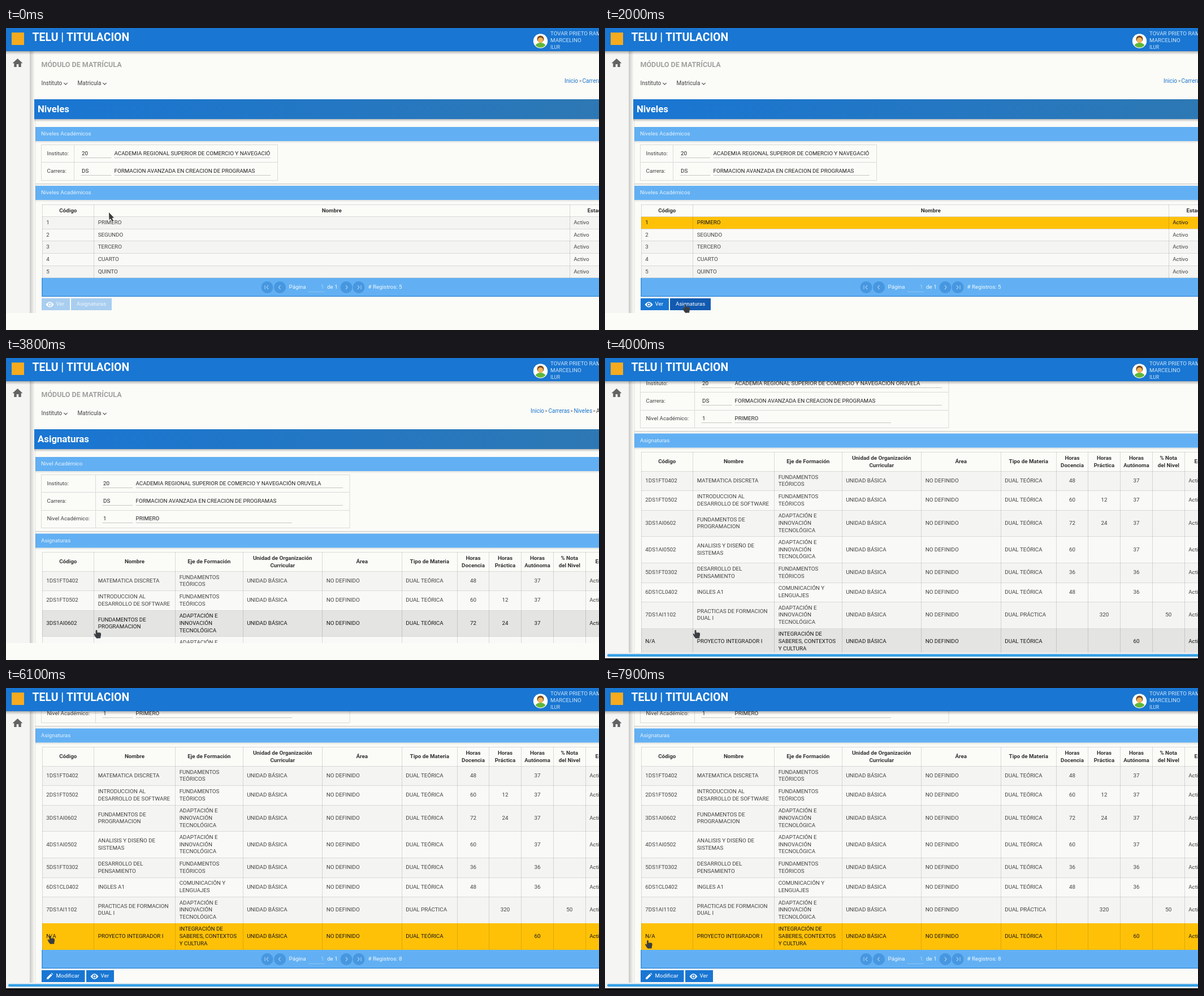
An HTML page with a canvas for the animation above (8 s loop, 1049x534 px).

```html
<!DOCTYPE html>
<html lang="es">
<head>
<meta charset="utf-8">
<title>Niveles y asignaturas</title>
<style>
html, body { margin: 0; width: 100%; height: 100%; overflow: hidden; background: #fbfbf8; }
canvas { display: block; }
</style>
</head>
<body>
<canvas id="stage" width="1049" height="534"></canvas>
<script>
const W = 1049, H = 534, LOOP = 8000, STEP = 100;
const ctx = document.getElementById('stage').getContext('2d');
const PAPER = '#fbfbf8', BLUE = '#1976d2', SKY = '#62b0f3', LINE = '#dadad8', INK = '#424242', AMBER = '#ffc107';
const SIZE = 9.8, SCROLL = 239;

const SCHOOL = 'ACADEMIA REGIONAL SUPERIOR DE COMERCIO Y NAVEGACIÓN ORUVELA';
const CAREER = 'FORMACION AVANZADA EN CREACION DE PROGRAMAS';

// Cursor stops: time, x, y of the tip
const PATH = [
  [0, 182, 326], [500, 136, 341], [1400, 136, 341], [1900, 142, 489], [2500, 142, 489],
  [2900, 157, 491], [3400, 157, 491], [3800, 160, 481], [4300, 160, 481], [5000, 239, 444],
  [5200, 239, 444], [6100, 78, 438], [7200, 78, 438], [7300, 75.5, 446]
];

const LEVELS = {
  top: 312, head: 21.5, pager: 442, cols: [64, 155.5, 997, 1090],
  titles: ['Código', 'Nombre', 'Estado'], centered: [],
  rows: ['PRIMERO', 'SEGUNDO', 'TERCERO', 'CUARTO', 'QUINTO'].map((n, i) => [String(i + 1), n, 'Activo']),
  rowHeight: () => 21.7
};

const BASIS = 'FUNDAMENTOS\nTEÓRICOS', ADAPT = 'ADAPTACIÓN E\nINNOVACIÓN\nTECNOLÓGICA';
const subject = (code, name, axis, a, b, c, note = '', kind = 'TEÓRICA') =>
  [code, name, axis, 'UNIDAD BÁSICA', 'NO DEFINIDO', 'DUAL ' + kind, a, b, c, note, 'Activo'];

const SUBJECTS = {
  top: 343.5, head: 34, pager: 702, cols: [64, 155.5, 299.5, 419, 559.5, 700, 798.5, 854.5, 911.5, 968.5, 1025, 1090],
  titles: ['Código', 'Nombre', 'Eje de Formación', 'Unidad de Organización\nCurricular', 'Área', 'Tipo de Materia',
    'Horas\nDocencia', 'Horas\nPráctica', 'Horas\nAutónoma', '% Nota\ndel Nivel', 'Estado'],
  centered: [6, 7, 8, 9],
  rows: [
    subject('1DS1FT0402', 'MATEMATICA DISCRETA', BASIS, '48', '', '37'),
    subject('2DS1FT0502', 'INTRODUCCION AL\nDESARROLLO DE SOFTWARE', BASIS, '60', '12', '37'),
    subject('3DS1AI0602', 'FUNDAMENTOS DE\nPROGRAMACION', ADAPT, '72', '24', '37'),
    subject('4DS1AI0502', 'ANALISIS Y DISEÑO DE\nSISTEMAS', ADAPT, '60', '', '37'),
    subject('5DS1FT0302', 'DESARROLLO DEL\nPENSAMIENTO', BASIS, '36', '', '36'),
    subject('6DS1CL0402', 'INGLES A1', 'COMUNICACIÓN Y\nLENGUAJES', '48', '', '36'),
    subject('7DS1AI1102', 'PRACTICAS DE FORMACION\nDUAL I', ADAPT, '', '320', '', '50', 'PRÁCTICA'),
    subject('N/A', 'PROYECTO INTEGRADOR I', 'INTEGRACIÓN DE\nSABERES, CONTEXTOS\nY CULTURA', '', '', '60')
  ],
  rowHeight: row => row[2].split('\n').length > 2 ? 46.8 : 34.3
};

for (const table of [LEVELS, SUBJECTS]) {
  let y = table.top + table.head;
  table.edges = [y, ...table.rows.map(row => y += table.rowHeight(row))];
}

function box(x, y, w, h, color) {
  ctx.fillStyle = color;
  ctx.fillRect(x, y, w, h);
}

function fade(x, y, w, h, from, to, across) {
  const g = across ? ctx.createLinearGradient(x, 0, x + w, 0) : ctx.createLinearGradient(0, y, 0, y + h);
  g.addColorStop(0, from);
  g.addColorStop(1, to);
  box(x, y, w, h, g);
}

// y is the vertical middle of the text block
function text(str, x, y, { size = SIZE, color = INK, weight = 400, align = 'left' } = {}) {
  ctx.font = `${weight} ${size}px Roboto, sans-serif`;
  ctx.fillStyle = color;
  ctx.textAlign = align;
  const lines = str.split('\n');
  lines.forEach((s, i) => ctx.fillText(s, x, y + size * 0.355 + (i - (lines.length - 1) / 2) * 12.6));
}

function stroke(color, width, points) {
  ctx.strokeStyle = color;
  ctx.lineWidth = width;
  ctx.beginPath();
  points.forEach(([x, y]) => ctx.lineTo(x, y));
  ctx.stroke();
}

function shape(color, points) {
  ctx.fillStyle = color;
  ctx.beginPath();
  points.forEach(([x, y]) => ctx.lineTo(x, y));
  ctx.closePath();
  ctx.fill();
}

function disc(x, y, r, color) {
  ctx.fillStyle = color;
  ctx.beginPath();
  ctx.arc(x, y, r, 0, Math.PI * 2);
  ctx.fill();
}

function clipped(x, y, w, h, draw) {
  ctx.save();
  ctx.beginPath();
  ctx.rect(x, y, w, h);
  ctx.clip();
  draw();
  ctx.restore();
}

function panelHead(label, y) {
  fade(52, y + 25, W, 4, 'rgba(0,0,0,.10)', 'rgba(0,0,0,0)');
  box(52, y, W, 25, SKY);
  text(label, 62, y + 12, { color: '#e6f2fd' });
}

function form(right, split, rows) {
  const top = 206.5, step = 31.4, bottom = top + step * rows.length;
  ctx.strokeStyle = LINE;
  ctx.lineWidth = 1;
  ctx.strokeRect(62.5, top, right - 62.5, Math.round(bottom - top));
  stroke(LINE, 1, [[split, top], [split, bottom]]);
  rows.forEach(([label, code, name, end], i) => {
    const y = top + step * i, mid = y + 14.6, base = Math.floor(y + 22.6);
    if (i) stroke(LINE, 1, [[62, Math.floor(y) + 0.5], [right, Math.floor(y) + 0.5]]);
    text(label, 72.5, mid);
    text(code, split + 13.5, mid, { color: '#222' });
    clipped(split + 70, y, end - split - 71, step, () => text(name, split + 71, mid, { color: '#222' }));
    box(split + 12, base, 54, 1, '#c6c6c4');
    box(split + 71, base, end - split - 71, 1, '#c6c6c4');
  });
}

function grid(table, hover, picked) {
  const { cols, top, edges, rows, pager } = table;
  const mid = i => (cols[i] + cols[i + 1]) / 2;
  const snap = y => Math.floor(y) + 0.5;
  rows.forEach((row, r) => box(64, edges[r], W, edges[r + 1] - edges[r], r === hover ? '#e4e4e2' : r % 2 ? '#f9f9f7' : '#f4f4f2'));
  [top, ...edges].forEach(y => stroke(LINE, 1, [[64, snap(y)], [W, snap(y)]]));
  if (picked >= 0) {
    const y = Math.round(edges[picked]);
    box(64, y, W, Math.round(edges[picked + 1]) - y, AMBER);
  }
  cols.forEach(x => stroke('rgba(0,0,0,.13)', 1, [[snap(x), top], [snap(x), pager]]));

  table.titles.forEach((s, i) => text(s, mid(i), top + table.head / 2 - 0.7, { weight: 700, color: '#333', align: 'center' }));
  rows.forEach((row, r) => {
    const y = (edges[r] + edges[r + 1]) / 2 - 1;
    const color = r === picked || r === hover ? '#161616' : INK;
    row.forEach((s, c) => {
      const center = table.centered.includes(c);
      text(s, center ? mid(c) : cols[c] + 7.2, y, { color, align: center ? 'center' : 'left' });
    });
  });
  pagerBar(pager, rows.length);
}

function pagerBar(y, count) {
  const mid = y + 16;
  box(63.5, y, W, 33, SKY);
  box(63.5, y, 1, 33, BLUE);
  box(63.5, y + 32, W, 1, BLUE);
  [462, 484.5, 602, 624].forEach((x, i) => {
    const dir = i < 2 ? -1 : 1, edge = i === 0 || i === 3;
    disc(x, mid + 0.5, 10.5, '#4797e0');
    const tip = x + dir * (edge ? 1 : 2);
    stroke('#9ccbf5', 1.2, [[tip - dir * 3, mid - 3], [tip, mid + 0.5], [tip - dir * 3, mid + 4]]);
    if (edge) stroke('#9ccbf5', 1.2, [[x + dir * 4, mid - 3], [x + dir * 4, mid + 4]]);
  });
  const white = { color: '#f4f9fe' };
  text('Página', 500.5, mid, white);
  text('1', 557, mid, { color: '#a9d3f8' });
  box(535, mid + 8, 29, 1, '#8cc4f5');
  text('de 1', 568, mid, white);
  text('# Registros: ' + count, 640.5, mid, white);
}

function eye(x, y) {
  ctx.fillStyle = '#fff';
  ctx.beginPath();
  ctx.moveTo(x - 7, y);
  ctx.quadraticCurveTo(x, y - 9.5, x + 7, y);
  ctx.quadraticCurveTo(x, y + 9.5, x - 7, y);
  ctx.fill();
}

function button(x, y, w, label, icon, enabled, hot) {
  const color = !enabled ? '#a8cef0' : hot ? '#125ab0' : BLUE;
  box(x, y, w, 21, color);
  const mid = y + 10;
  if (icon === 'eye') {
    eye(x + 14.5, mid + 1);
    disc(x + 14.5, mid + 1, 3.2, color);
    disc(x + 14.5, mid + 1, 1.8, '#fff');
  } else if (icon === 'pencil') {
    const px = x + 9, py = mid + 6;
    shape('#fff', [[px, py], [px, py - 2.6], [px + 7, py - 9.5], [px + 9.6, py - 7], [px + 2.6, py]]);
    shape('#fff', [[px + 8, py - 10.4], [px + 9, py - 11.2], [px + 11.4, py - 8.8], [px + 10.5, py - 7.9]]);
  }
  text(label, x + (icon ? 25.5 : 10), mid, { color: enabled ? '#fff' : '#eef5fb' });
}

function chevron(x, y) {
  stroke('#555', 1.1, [[x - 3.2, y - 1.6], [x, y + 1.6], [x + 3.2, y - 1.6]]);
}

function crumbs(items) {
  items.forEach(([s, x]) => text(s, x, 93.5, { size: s === '>' ? 8 : 10, color: s.length > 1 ? '#1b76cc' : '#444' }));
}

function pageTop(title) {
  text('MÓDULO DE MATRÍCULA', 62.5, 64.5, { size: 12.5, weight: 700, color: '#a0a09e' });
  text('Instituto', 62.5, 97, { size: 10 });
  text('Matricula', 126.5, 97, { size: 10 });
  chevron(105.5, 98.5);
  chevron(174.5, 98.5);
  fade(50, 161, W, 5, 'rgba(0,0,0,.25)', 'rgba(0,0,0,0)');
  fade(50, 126, W - 50, 35, '#1976d3', '#2d78b4', true);
  text(title, 56, 143.5, { size: 16.8, weight: 700, color: '#fff' });
}

function panelEdge(y) {
  box(52, y, W, 1, '#cfcfcd');
  fade(52, y + 1, W, 3, 'rgba(0,0,0,.07)', 'rgba(0,0,0,0)');
}

function levelsPage(s) {
  pageTop('Niveles');
  crumbs([['Inicio', 988], ['>', 1014], ['Carreras', 1019.5]]);
  panelEdge(275);
  panelHead('Niveles Académicos', 175);
  form(480.5, 120.5, [['Instituto:', '20', SCHOOL, 468], ['Carrera:', 'DS', CAREER, 468]]);
  panelHead('Niveles Académicos', 279);
  grid(LEVELS, s.hover, s.picked);
  const on = s.picked >= 0;
  button(63, 478, 50, 'Ver', 'eye', on);
  button(115, 478, 72, 'Asignaturas', '', on, s.y > 478);
}

function subjectsPage(s) {
  pageTop('Asignaturas');
  crumbs([['Inicio', 928], ['>', 953.5], ['Carreras', 959.5], ['>', 998.5], ['Niveles', 1004.5], ['>', 1038.5], ['A', 1044]]);
  panelEdge(306);
  panelHead('Nivel Académico', 175);
  form(608, 158.5, [['Instituto:', '20', SCHOOL, 596], ['Carrera:', 'DS', CAREER, 596], ['Nivel Académico:', '1', 'PRIMERO', 506]]);
  panelHead('Asignaturas', 310.5);
  grid(SUBJECTS, s.hover, s.picked);
  const on = s.picked >= 0;
  button(63, 738, 76.5, 'Modificar', 'pencil', on);
  button(142, 738, 49, 'Ver', 'eye', on);
}

function avatar(x, y) {
  disc(x, y, 12.7, '#fdfdfb');
  ctx.save();
  ctx.beginPath();
  ctx.arc(x, y, 11.5, 0, Math.PI * 2);
  ctx.clip();
  ctx.fillStyle = '#5fb83a';
  ctx.beginPath();
  ctx.ellipse(x, y + 10, 9.5, 7, 0, 0, Math.PI * 2);
  ctx.fill();
  ctx.restore();
  disc(x, y - 3.5, 6, '#7a4a1c');
  disc(x, y - 1.5, 4.8, '#f3b25a');
}

function header(loaded) {
  fade(0, 41, W, 6, 'rgba(0,0,0,.28)', 'rgba(0,0,0,0)');
  box(0, 0, W, 41, BLUE);
  text('TELU | TITULACION', 46.5, 16, { size: 19.4, weight: 700, color: '#fff' });
  if (!loaded) return;
  box(10, 8, 22, 22, '#f6ab1f');
  avatar(945.5, 23);
  const pale = { color: '#cfe4f8' };
  text('TOVAR PRIETO RAMIRO', 963, 9.5, pale);
  text('MARCELINO', 963, 22, pale);
  text('ILUR', 963, 34.5, { size: 8.4, color: '#cfe4f8' });
}

function sidebar(bottom) {
  box(0, 41, 42, bottom - 41, '#f5f5f3');
  fade(42, 41, 9, bottom - 41, 'rgba(0,0,0,.20)', 'rgba(0,0,0,0)', true);
  shape('#636363', [[20.5, 54], [29.5, 62.3], [26.7, 62.3], [26.7, 69], [22.3, 69], [22.3, 64], [18.7, 64],
    [18.7, 69], [14.3, 69], [14.3, 62.3], [11.5, 62.3]]);
}

function arrow(x, y) {
  shape('#3c3c3c', [[x, y], [x + 0.5, y + 13.5], [x + 3, y + 11], [x + 5.5, y + 16], [x + 8, y + 15], [x + 5.5, y + 10], [x + 9, y + 9.5]]);
}

function hand(x, y) {
  ctx.fillStyle = '#3a3d42';
  ctx.beginPath();
  ctx.roundRect(x - 1.4, y, 2.8, 9, 1.4);
  ctx.roundRect(x - 1.4, y + 4.4, 9.4, 7.6, 2.2);
  ctx.roundRect(x, y + 8.5, 7.4, 6, 1);
  ctx.fill();
  shape('#3a3d42', [[x - 4.6, y + 7], [x - 3.2, y + 6.2], [x - 1, y + 8.5], [x + 3, y + 14.5], [x, y + 14.5], [x - 2.4, y + 11.4]]);
}

const ease = p => p * p * (3 - 2 * p);
const ramp = (t, a, b) => ease(Math.min(1, Math.max(0, (t - a) / (b - a))));

function cursorAt(t) {
  const i = PATH.findIndex(p => p[0] > t);
  if (i < 0) return PATH[PATH.length - 1].slice(1);
  const [t0, x0, y0] = PATH[i - 1], [t1, x1, y1] = PATH[i], p = ramp(t, t0, t1);
  return [x0 + (x1 - x0) * p, y0 + (y1 - y0) * p];
}

function draw(t) {
  const second = t >= 2600;
  const table = second ? SUBJECTS : LEVELS;
  const scroll = Math.round(SCROLL * ramp(t, 3800, 4100));
  const bottom = scroll ? 521 : 504;
  const [x, y] = cursorAt(t);
  const ready = !second || t >= 3300;
  const hover = ready ? table.rows.findIndex((_, i) => y + scroll >= table.edges[i] && y + scroll < table.edges[i + 1]) : -1;
  const picked = second ? (t >= 5700 ? 7 : -1) : (t >= 700 ? 0 : -1);

  box(0, 0, W, H, PAPER);
  clipped(0, 41, W, bottom - 41, () => {
    ctx.save();
    ctx.translate(0, -scroll);
    (second ? subjectsPage : levelsPage)({ hover, picked, y });
    ctx.restore();
    box(51.5, Math.max(41, 162 - scroll), 1, bottom, 'rgba(0,0,0,.10)');
    sidebar(bottom);
  });
  header(t < 2600 || t >= 3100);
  if (scroll) {
    box(0, 521, W, 10, '#eef1f2');
    ctx.fillStyle = '#35a0e6';
    ctx.beginPath();
    ctx.roundRect(4, 523.5, W, 4.5, 2);
    ctx.fill();
    box(0, 531, W, 3, '#0c0a0a');
  }
  clipped(0, 0, W, bottom, () => (t < 200 ? arrow : hand)(x, y));
}

const start = performance.now();
function tick() {
  const t = (performance.now() - start) % LOOP;
  draw(Math.floor(t / STEP) * STEP);
  requestAnimationFrame(tick);
}
tick();
</script>
</body>
</html>
```
